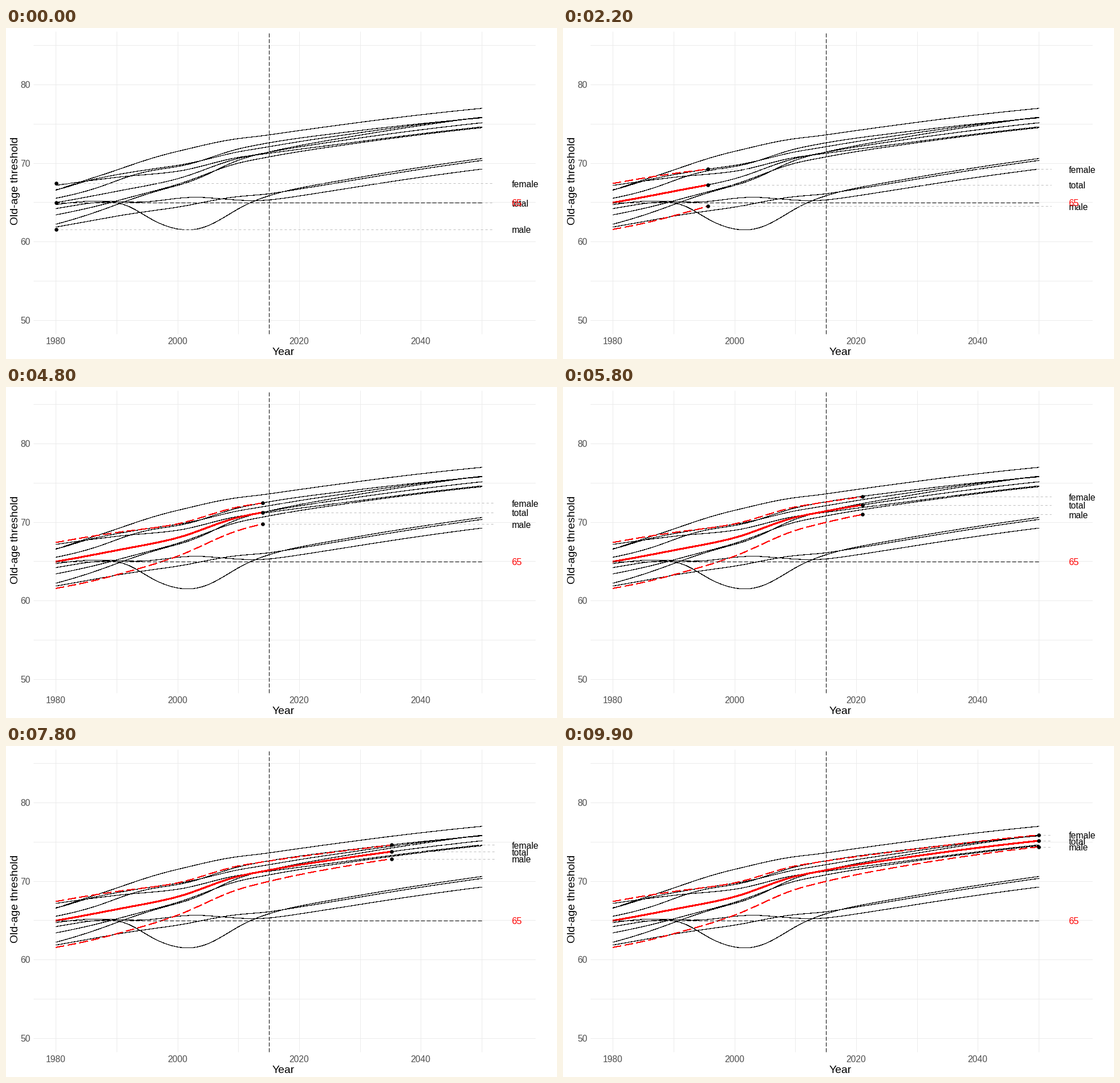
Write a matplotlib script that moves like this. It is 966 px wide and 580 px high and loops after 10 s.

```python
import numpy as np
import matplotlib.pyplot as plt
from matplotlib.animation import FuncAnimation

W, H, DPI = 966, 580, 100
FRAMES, STEP_MS = 100, 100
PT = 72 / DPI  # points per pixel
YEARS = np.arange(1980, 2051)

plt.rcParams["font.family"] = "Liberation Sans"
plt.rcParams["lines.scale_dashes"] = False


def px(year):
    return 87.2 + (year - 1980) * 10.668


def py(age):
    return 511 - (age - 50) * 13.75


def hermite(t, x, y):
    """Smooth curve through a few key points."""
    x, y = np.array(x), np.array(y)
    slope = np.gradient(y, x, edge_order=2)
    i = np.clip(np.searchsorted(x, t, side="right") - 1, 0, len(x) - 2)
    h = x[i + 1] - x[i]
    u = (t - x[i]) / h
    return (y[i] + (y[i + 1] - y[i]) * u * u * (3 - 2 * u)
            + h * u * (1 - u) * ((1 - u) * slope[i] - u * slope[i + 1]))


# Average threshold of both sexes; every other curve is an offset from it
total = hermite(YEARS, [1980, 1990, 2000, 2010, 2015, 2030, 2050],
                [64.95, 66.4, 68.0, 70.6, 71.38, 73.2, 75.13])


def gap(first, last):
    """Gap between one sex and the average, closing over time."""
    return last + (first - last) / (1 + ((YEARS - 1980) / 25) ** 2.4)


def country(start, now, end, mid, width, bump=0, at=2000, spread=1):
    """Offset: logistic shift to `now`, linear drift to `end`, one bump."""
    shift = (now - start) / (1 + np.exp((mid - YEARS) / width))
    drift = (end - now) * np.maximum(YEARS - 2015, 0) / 35
    return (total + start + shift + drift
            + bump * np.exp(-((YEARS - at) / spread) ** 2))


countries = [
    country(1.2, 2.1, 1.84, 1981, 2, 1.4, 1999, 10),
    country(2.15, 0.65, 0.7, 2003, 3.5, -0.5, 1980, 4),
    country(0.5, 1.2, 0.62, 1990, 4, 0.75, 1994.5, 7),
    country(2.4, -0.5, -0.53, 2000, 7.7),
    country(-1.6, -0.6, -0.63, 1992, 4),
    country(-3.2, 0.1, 0.72, 1991, 6, -0.55, 2004, 6),
    country(-0.75, -5.35, -4.55, 1993.8, 2.2, -2, 2004.5, 7),
    country(-0.2, -6.4, -5.9, 2004.7, 3.5, -1.5, 1995, 8),
    country(-3.1, -5.6, -4.8, 2006, 4.5),
]

fig = plt.figure(figsize=(W / DPI, H / DPI), dpi=DPI, facecolor="white")
ax = fig.add_axes([0, 0, 1, 1])
# Whole numbers fall inside pixels, so straight lines snap to them
ax.set_xlim(-0.4, W - 0.4)
ax.set_ylim(H - 0.6, -0.6)
ax.axis("off")


def line(x, y, color="black", width=1, dash=None, z=2, smooth=True):
    style = (0, [d * PT for d in dash]) if dash else "-"
    return ax.plot(x, y, color=color, lw=width * PT, ls=style, zorder=z,
                   antialiased=smooth, solid_capstyle="butt")[0]


def curve(x, y, color="black", width=1, **kw):
    # Hard-edged strokes cover every pixel they touch, hence the thinner pen
    return line(x, y, color, width - 0.85, smooth=False, **kw)


def label(x, y, text, size, color="black", ha="left", z=6, **kw):
    return ax.text(x, y, text, fontsize=size * PT, color=color, ha=ha,
                   va="baseline", zorder=z, **kw)


# Grid and axes
for age in range(50, 90, 5):
    line([48, 928], [round(py(age) - 0.3)] * 2, "#EBEBEB", z=1)
    if age % 10 == 0 and age <= 80:
        label(42.5, py(age) + 6, str(age), 15.6, "#4D4D4D", "right")
for year in range(1980, 2060, 10):
    line([round(px(year))] * 2, [535, 5], "#EBEBEB", z=1)
    if year % 20 == 0:
        label(px(year) - 0.7, 553, str(year), 15.6, "#4D4D4D", "center")
label(486, 572.5, "Year", 19.4, ha="center")
label(21, 267, "Old-age threshold", 19.4, ha="center",
      rotation=90, rotation_mode="anchor")

# Static curves and reference lines
for ages in countries + [total]:
    curve(px(YEARS), py(ages))
line([461, 461], [535, 5], dash=(7, 3), z=5)
line([87, 834], [305, 305], dash=(7, 3), z=5)
label(885.5, 311, "65", 16.2, "red", z=7)


class Series:
    """A red curve with its moving point, leader and label."""

    def __init__(self, name, ages, width, dash=None):
        self.ages = ages
        self.curve = curve([], [], "red", width, dash=dash, z=3)
        self.leader = line([], [], "#BEBEBE", dash=(4, 4), z=4)
        self.point = ax.plot([], [], "o", color="black", ms=6.6 * PT, mew=0,
                             zorder=4.5)[0]
        self.text = label(px(2055) - 1.2, 0, name, 15.7)

    def move(self, year):
        age = np.interp(year, YEARS, self.ages)
        x, y = px(year), py(age)
        past = YEARS < year
        self.curve.set_data(np.append(px(YEARS[past]), x),
                            np.append(py(self.ages[past]), y))
        self.leader.set_data([x, px(2052)], [y, y])
        self.point.set_data([x], [y])
        self.text.set_y(y + 6.5)


series = [
    Series("female", total + gap(2.45, 0.6), 2, (14, 6)),
    Series("male", total - gap(3.4, 0.55), 2, (14, 6)),
    Series("total", total, 3),
]


def update(frame):
    year = 1980 + 70 * frame / (FRAMES - 1)
    for s in series:
        s.move(year)
    return []


anim = FuncAnimation(fig, update, frames=FRAMES, interval=STEP_MS,
                     repeat=True, repeat_delay=0, blit=False)
plt.show()
```
